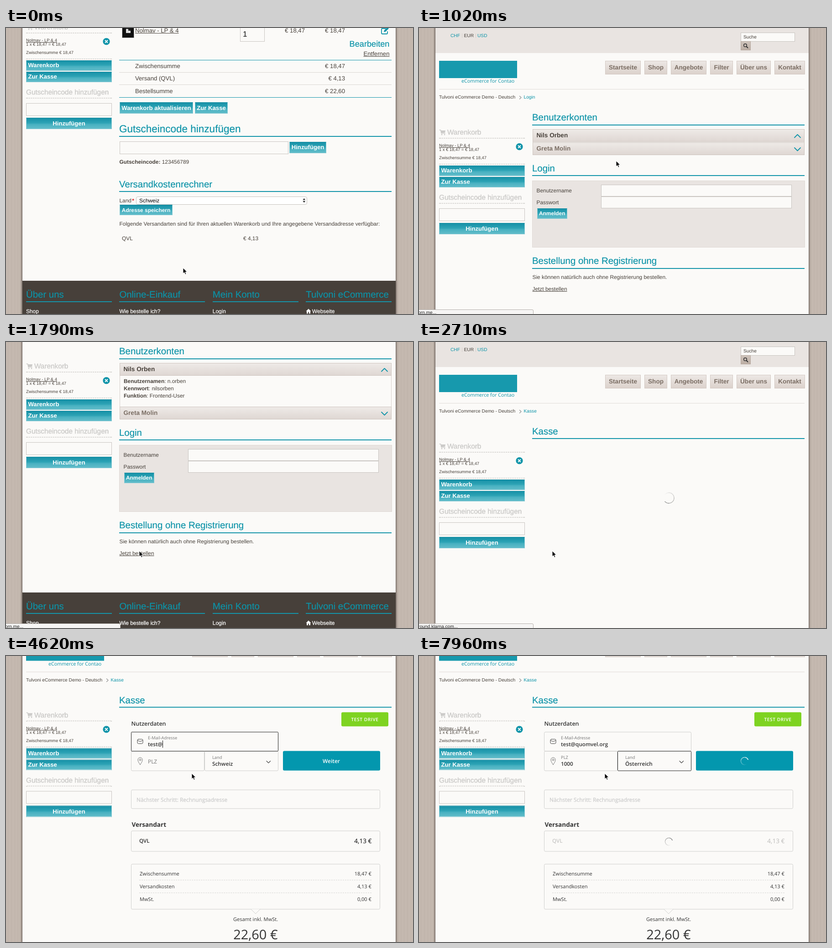
Animation, 892 px wide and 628 px high, one loop 8000 ms. Source, as an HTML page:

```html
<!DOCTYPE html>
<html lang="de">
<head>
<meta charset="utf-8">
<title>Kasse</title>
<style>
html, body { margin: 0; width: 100%; height: 100%; overflow: hidden; }
#stage {
  position: relative; width: 892px; height: 628px; overflow: hidden;
  background: repeating-linear-gradient(90deg, #c5b9b0 0 3px, #c2b6ad 3px 7px);
  font-family: "Liberation Sans", Arial, sans-serif; color: #47403a;
  text-rendering: geometricPrecision;
}
#stage div, #stage span, #stage svg { position: absolute; box-sizing: border-box; }
#stage [hidden] { display: none; }
#stage span { line-height: 20px; white-space: pre; }
#paper { left: 36px; top: -9px; width: 818px; height: 646px; background: #fbfaf8; box-shadow: 0 0 4px 1px #4d443e; }
#world, .page { left: 0; top: 0; width: 892px; }
.c { transform: translateX(-50%); }
.r { transform: translateX(-100%); }
.b { font-weight: bold; }
.k { font-family: "Open Sans", "Noto Sans", sans-serif; }
.s { font-weight: 600; }
.u { text-decoration: underline; }
.teal { color: #0c93a8; }
.head { color: #0c93a8; -webkit-text-stroke: .2px #0c93a8; }
.grey { color: #cbcac8; -webkit-text-stroke: .4px #cbcac8; }
.white { color: #fff; }
.btn { background: linear-gradient(#1791a7, #2da3b5 45%, #48b1c1 60%, #61bcc9); border: 1px solid #8ccbd5; border-top-color: #168ca1; }
.field { background: #fbfaf8; border: 1px solid #c9c5c1; }
.tab { background: linear-gradient(#ece7e4, #dcd2cc); border: 1px solid #d3c9c3; }
.bar { background: linear-gradient(#eeeae7, #dfd7d3); border: 1px solid #cdc4be; }
.dots { border-top: 2px dotted #cfcdca; }
.dash { border-top: 1px dashed #d2d2d0; }
.card { border: 1px solid #cfcfcd; border-radius: 3px; }
.on { border: 1.6px solid #222; border-radius: 2px; z-index: 2; }
.spin {
  border-radius: 50%; background: conic-gradient(transparent 20%, currentColor);
  -webkit-mask: radial-gradient(closest-side, transparent calc(100% - 2px), #000 calc(100% - 1.4px));
  mask: radial-gradient(closest-side, transparent calc(100% - 2px), #000 calc(100% - 1.4px));
}
.caret { display: inline-block; width: 1px; height: 16px; margin-right: -1px; background: #111; vertical-align: -4px; }
#frame { left: 0; top: 0; width: 892px; overflow: hidden; color: #333; }
#frame .ph { color: #757575; }
#status { left: -3px; top: 618px; width: 254px; height: 20px; overflow: hidden; background: #f6f5f4; border: 1px solid #b5b0ac; border-radius: 0 3px 0 0; color: #222; }
</style>
</head>
<body>
<div id="stage"></div>
<script>
const LOOP = 8000;
const box = (x, y, w, h, cls = '', css = '', id = '') =>
  `<div id="${id}" class="${cls}" style="left:${x}px;top:${y}px;width:${w}px;height:${h}px;${css}"></div>`;
// y is the middle of the capitals
const txt = (x, y, s, size, cls = '', css = '', id = '') =>
  `<span id="${id}" class="${cls}" style="left:${x}px;top:${y - 10}px;font-size:${size}px;${css}">${s}</span>`;
const svg = (x, y, w, h, body, css = '') =>
  `<svg width="${w}" height="${h}" style="left:${x}px;top:${y}px;fill:none;stroke-linecap:round;stroke-linejoin:round;${css}">${body}</svg>`;
const rule = (x, y, w, h = 2, color = '#1495aa') => box(x, y, w, h, '', `background:${color}`);
const title = (y, s, size = 20.4) => txt(248, y, s, size, 'head') + rule(248, y + 14.5, 597);
const button = (x, y, w, h, s, size = 13.17, left = false) =>
  box(x, y, w, h, 'btn') + txt(left ? x + 4.5 : x + w / 2, y + h / 2, s, size, 'b white' + (left ? '' : ' c'));
const chevron = (x, y, w, h, color, width = 1.5) =>
  svg(x, y - (h < 0 ? 0 : 0), w + 2, Math.abs(h) + 2,
    `<path d="M1 ${h < 0 ? 1 - h : 1}l${w / 2} ${h}l${w / 2} ${-h}" stroke="${color}" stroke-width="${width}"/>`);

const item = 'Nolmav - LP &amp; 4', carrier = 'QVL';

function header() {
  const nav = [['Startseite', 408, 78], ['Shop', 494, 50], ['Angebote', 552, 78], ['Filter', 638, 50], ['Über uns', 696, 75], ['Kontakt', 779, 67]];
  return rule(36, -10, 818, 65, '#e9e4e1') +
    txt(69, 17.5, 'CHF', 10.2, 'teal') + txt(98.5, 17.5, 'EUR', 10.2) + txt(128, 17.5, 'USD', 10.2, 'teal') +
    rule(94, 12, 1, 10, '#d5cec9') + rule(124, 12, 1, 10, '#d5cec9') +
    box(705, 9.5, 119, 20, 'field') + txt(711, 21, 'Suche', 10.2) +
    box(705, 29, 22, 20, '', 'background:linear-gradient(#cfc4bc,#bcaea4);border:1px solid #b5a79d') +
    svg(710, 33, 13, 13, '<circle cx="5" cy="5" r="3.3" stroke="#333" stroke-width="1.5"/><path d="M7.7 7.7L10.5 10.5" stroke="#333" stroke-width="2"/>') +
    rule(44, 72, 171, 38, '#1799ad') + txt(93, 117, 'eCommerce for Contao', 10.7, 'k teal') +
    nav.map(([s, x, w]) => box(x, 72, w, 29.5, 'tab') + txt(x + w / 2, 86.5, s, 13.6, 'b c', 'color:#7a6d63')).join('') +
    rule(44, 134, 801, 1, '#e0dcd8') + txt(44, 152.5, 'Tulvoni eCommerce Demo - Deutsch', 10.2) +
    svg(219, 148, 7, 10, '<path d="M1.5 1.5l3.5 3.3l-3.5 3.3" stroke="#999" stroke-width="1.4"/>') +
    txt(229.5, 152.5, '', 10.2, 'teal', '', 'crumb');
}

function sidebar() {
  return svg(44, 222, 16, 15, '<path d="M1 2h2.5l1.5 7h8" stroke="#cbcac8" stroke-width="1.5"/><path d="M4 3h10l-1 4.5l-8 .8z" fill="#cbcac8"/><circle cx="6" cy="12" r="1.4" fill="#cbcac8"/><circle cx="12" cy="12" r="1.4" fill="#cbcac8"/>') +
    txt(62, 229.5, 'Warenkorb', 15.3, 'grey') + box(44, 241, 188, 2, 'dots') +
    txt(44, 257.5, item, 9.35, 'u') + txt(44, 267, '1 x € 18,47 = € 18,47', 9.35) +
    svg(211, 252, 18, 18, '<circle cx="9" cy="8.7" r="7.6" fill="#1094a9"/><path d="M6.6 6.3l4.8 4.8M11.4 6.3l-4.8 4.8" stroke="#fff" stroke-width="2"/>') +
    txt(44, 285, 'Zwischensumme € 18,47', 9.35) + box(44, 298, 188, 2, 'dots') +
    button(44, 302, 188, 22.5, 'Warenkorb', 13.1, true) + button(44, 327, 188, 22.5, 'Zur Kasse', 13.1, true) +
    txt(44, 372.5, 'Gutscheincode hinzufügen', 15.3, 'grey') + box(44, 384, 188, 2, 'dots') +
    box(44, 396, 188, 27.5, 'field') + button(44, 428, 188, 25, 'Hinzufügen', 13.1);
}

function cart() {
  const sums = [['Zwischensumme', '€ 18,47'], [`Versand (${carrier})`, '€ 4,13'], ['Bestellsumme', '€ 22,60']];
  return title(197, 'Warenkorb') +
    box(254, 225, 27, 28, '', 'background:#111;border:1px solid #bbb') + rule(263, 233, 10, 9, '#ddd') + rule(268, 233, 5, 4, '#222') +
    txt(283, 236.5, item, 13.17, 'u') + box(513, 227, 54, 34, 'field') + txt(519, 244.5, '1', 17, '', 'color:#111') +
    txt(655, 236.5, '€ 18,47', 13.17, 'r') + txt(743, 236.5, '€ 18,47', 13.17, 'r') +
    svg(821, 228, 20, 20, '<path d="M11 4H4q-2 0-2 2v8q0 2 2 2h9q2 0 2-2v-3" stroke="#1094a9" stroke-width="1.8"/><path d="M7 12l1-4l7-7l3 3l-7 7z" fill="#1094a9"/>') +
    txt(840.5, 265.5, 'Bearbeiten', 18.2, 'r head') + txt(840.5, 287.5, 'Entfernen', 13.17, 'r u') +
    rule(248, 301, 597, 1) + rule(248, 328, 597, 1, '#d9d6d3') + rule(248, 355, 597, 1, '#d9d6d3') + rule(248, 383, 597, 1) +
    sums.map(([a, b], i) => txt(283, 315 + i * 27.4, a, 13.17) + txt(743, 315 + i * 27.4, b, 13.17, 'r')).join('') +
    button(249, 394, 161, 25, 'Warenkorb aktualisieren') + button(414, 394, 72, 25, 'Zur Kasse') +
    title(453, 'Gutscheincode hinzufügen', 22.5) + box(248.5, 480, 370, 27.5, 'field') + button(621, 480.5, 81, 25, 'Hinzufügen') +
    txt(248.5, 525, '<b>Gutscheincode:</b> 123456789', 11.9) + title(574.5, 'Versandkostenrechner') +
    txt(248.5, 609.5, 'Land<b style="color:#d22"> *</b>', 11.9, '', 'word-spacing:-2px') +
    box(285, 601, 375, 17.5, '', 'background:#fff;border:1px solid #c6c2be;border-radius:4px') + txt(292, 609.5, 'Schweiz', 11.9, '', 'color:#000') +
    svg(649, 604, 9, 12, '<path d="M1.5 4.6L4.3 1L7.1 4.6zM1.5 6.8L4.3 10.4L7.1 6.8z" fill="#222"/>') +
    button(249, 619, 116, 23, 'Adresse speichern', 11.9) +
    txt(248.5, 660.5, 'Folgende Versandarten sind für Ihren aktuellen Warenkorb und Ihre angegebene Versandadresse verfügbar:', 11.9) +
    txt(254, 692.5, carrier, 11.9) + txt(520, 692.5, '€ 4,13', 11.9);
}

function login() {
  const info = [['Benutzernamen', 'n.orben'], ['Kennwort', 'nilsorben'], ['Funktion', 'Frontend-User']];
  return title(197, 'Benutzerkonten') +
    `<div id="fold" style="left:248.5px;top:249px;width:596.5px;height:0;overflow:hidden;border:solid #d5cec9;border-width:0 1px">` +
    info.map(([a, b], i) => txt(8.5, 13 + i * 16.2, `<b>${a}</b>: ${b}`, 11.9)).join('') + '</div>' +
    box(248.5, 222, 596.5, 27.5, 'bar') + txt(257.5, 236, 'Nils Orben', 13.6, 'b') + chevron(822, 233, 13, -6.5, '#1094a9', 1.8) +
    '<div id="rest">' +
    box(248.5, 251, 596.5, 27.5, 'bar') + txt(257.5, 265, 'Greta Molin', 13.6, 'b', 'color:#7a6d63') + chevron(822, 262, 13, 6.5, '#1094a9', 1.8) +
    title(308.5, 'Login') + box(248, 334.5, 597.5, 147, '', 'background:#e9e4e1;border:1px solid #dfd9d5') +
    txt(257.5, 357, 'Benutzername', 11.9) + txt(257.5, 383, 'Passwort', 11.9) +
    box(398.5, 344, 418.5, 26, 'field') + box(398.5, 369.5, 418.5, 26, 'field') + button(258.5, 396, 66.5, 22.5, 'Anmelden', 11.9) +
    title(512, 'Bestellung ohne Registrierung') +
    txt(248.5, 546.5, 'Sie können natürlich auch ohne Registrierung bestellen.', 11.9) + txt(248.5, 573, 'Jetzt bestellen', 11.9, 'u') + '</div>';
}

function checkout() {
  const sums = [['Zwischensumme', '18,47 €'], ['Versandkosten', '4,13 €'], ['MwSt.', '0,00 €']];
  return title(196.5, 'Kasse') + box(534.5, 329.5, 25, 25, 'spin', 'color:#999', 'wait') + '<div id="frame">' +
    txt(274.5, 248, 'Nutzerdaten', 12.5, 'k s') +
    box(735, 223, 103, 30.5, '', 'background:#7ed321;border-radius:3px') + txt(786.5, 238, 'TEST DRIVE', 10.2, 'k s c white', 'letter-spacing:.55px') +
    box(274, 265.5, 322.5, 43.5, 'card', '', 'mailBox') + box(274, 308, 161, 43.5, 'card', '', 'zipBox') + box(434.5, 308, 162, 43.5, 'card', '', 'landBox') +
    svg(287, 281, 15, 13, '<rect x="1" y="1.2" width="12" height="9.8" rx="2.4" stroke="#444"/><path d="M1.2 3.4q5.8 5.4 11.6 0" stroke="#444"/>') +
    svg(287, 321, 14, 19, '<path d="M7 17Q2 10.5 2 6.4a5 5 0 0 1 10 0Q12 10.5 7 17z" stroke="#777"/><circle cx="7" cy="6.5" r="1.9" stroke="#777"/>') +
    txt(311, 287.5, 'E-Mail-Adresse', 11.9, 'k ph', '', 'mailLabel') + txt(311, 293, '', 11.7, 'k s', '', 'mail') +
    txt(311, 330.5, 'PLZ', 11.9, 'k ph', '', 'zipLabel') + txt(311, 335.5, '', 11.7, 'k s', '', 'zip') +
    txt(452, 322, 'Land', 9.35, 'k ph') + txt(452, 335.5, '', 11.8, 'k s', '', 'land') + chevron(570, 328.5, 8.5, 4.5, '#444', 1.1) +
    box(606.5, 308, 213, 43, '', 'background:#0397ae;border-radius:3px') +
    txt(713, 330, 'Weiter', 11.9, 'k s c white', '', 'next') + box(704.5, 321, 17.5, 17.5, 'spin white', '', 'nextSpin') +
    box(274, 393, 545.5, 41.5, 'card') + txt(286, 414.5, 'Nächster Schritt: Rechnungsadresse', 11.9, 'k', 'color:#ccc;-webkit-text-stroke:.3px #ccc') +
    txt(275.5, 468.5, 'Versandart', 13.6, 'k b') + box(274, 483, 545.5, 45.5, 'card') +
    '<div id="ship">' + txt(292, 505, carrier, 11.7, 'k s') + txt(801.5, 505, '4,13 €', 13.6, 'k r', 'color:#000') + '</div>' +
    box(538.5, 497.5, 17.5, 17.5, 'spin', 'color:#888', 'shipSpin') +
    box(274, 555.5, 545.5, 100.5, 'card') +
    sums.map(([a, b], i) => txt(293, 578 + i * 28, a, 11.05, 'k') + txt(801, 578 + i * 28, b, 11.05, 'k r')).join('') +
    box(292, 591, 509, 1, 'dash') + box(292, 619, 509, 1, 'dash') +
    svg(536, 654, 22, 14, '<path d="M1 1.5L11 11.5L21 1.5" fill="#fbfaf8" stroke="#cfcfcd"/>') +
    txt(547, 677.5, 'Gesamt inkl. MwSt.', 11.05, 'k c') + txt(547, 710.5, '22,60 €', 28.9, 'k c') + '</div>';
}

function footer() {
  const cols = [['Über uns', 'Shop'], ['Online-Einkauf', 'Wie bestelle ich?'], ['Mein Konto', 'Login'], ['Tulvoni eCommerce', '   Webseite']];
  return rule(36, 0, 818, 400, '#47403a') + cols.map(([a, b], i) => {
    const x = 44 + i * 204.4;
    return txt(x, 30.5, a, 20.4, 'head') + rule(x, 45, 188, 1.5) +
      txt(x + (i > 2 ? 4 : 0), 67, b, 11.9, 'white', '-webkit-text-stroke:.25px #fff');
  }).join('') + svg(657, 61, 13, 12, '<path d="M6 0.5L0.5 6H2v5h3V7.5h2V11h3V6h1.5z" fill="#fff"/>');
}

stage.innerHTML = '<div id="paper"></div><div id="world">' + header() + sidebar() +
  [['cart', cart], ['login', login], ['checkout', checkout], ['foot', footer]].map(([id, f]) => `<div id="${id}" class="page">${f()}</div>`).join('') +
  '</div><div id="status">' + txt(0, 7, '', 10.2, '', '', 'statusText') + '</div>' +
  `<div id="pointer">${svg(-1, -1, 14, 19, '<path d="M1 1V13.2L3.9 10.6L5.9 15.2L8 14.3L6 9.8H9.8z" fill="#000" stroke="#fff"/>')}</div>`;

const el = id => document.getElementById(id);
const show = (id, on) => { el(id).hidden = !on; };

const scrollKeys = [[50, 231], [280, 112], [970, 112], [970, 0], [1070, 0], [1300, 139], [1340, 139], [1570, 176], [2170, 176], [2170, 0], [3260, 0], [3740, 99.5]];
const foldKeys = [[1040, 0], [1310, 67]];
const pointerX = [[50, 388], [280, 432], [1050, 432], [1300, 285], [1340, 285], [1520, 292], [3010, 292], [3500, 242], [3850, 242], [4450, 407]];
const pointerY = [[50, 527], [280, 292], [1050, 292], [1300, 558], [1340, 558], [1520, 459], [3010, 459], [3500, 517], [3850, 517], [4450, 258]];
const statusKeys = [[0, ''], [500, 'orn.me/kasse'], [640, 'orn.me...'], [1220, ''], [1520, 'orn.me/kasse'], [1790, 'orn.me...'], [2420, 'round.klarna.com...'], [3160, '']];
const mailTimes = [4120, 4250, 4380, 4480, 4620, 4670, 4820, 4960, 5100, 5230, 5360, 5620, 5970, 6180, 6260, 6330];
const zipTimes = [6680, 6790, 6890, 6990];

// eased value from a table of [time, value]
function at(keys, t) {
  const i = keys.findIndex(k => k[0] > t);
  if (i < 0) return keys[keys.length - 1][1];
  if (!i) return keys[0][1];
  const [t0, a] = keys[i - 1], [t1, b] = keys[i], q = 1 - (t - t0) / (t1 - t0);
  return a + (b - a) * (1 - q * q);
}
const last = (keys, t) => keys.filter(k => k[0] <= t).pop()[1];

function input(id, text, times, t, focus, empty, full) {
  const typed = text.slice(0, times.filter(x => x <= t).length);
  const value = typed + (focus ? '<i class="caret"></i>' : '');
  if (el(id).innerHTML !== value) el(id).innerHTML = value;
  el(id).style.top = (typed ? full[1] : empty) - 10 + 'px';
  el(id + 'Label').style.top = (typed ? full[0] : empty) - 10 + 'px';
  el(id + 'Label').style.fontSize = typed ? '9.35px' : '11.9px';
  el(id + 'Box').classList.toggle('on', focus);
}

function render(t) {
  const page = t < 970 ? 'cart' : t < 2170 ? 'login' : 'checkout';
  for (const id of ['cart', 'login', 'checkout']) show(id, id === page);
  el('world').style.transform = `translateY(${-at(scrollKeys, t)}px)`;
  el('crumb').textContent = { cart: 'Warenkorb', login: 'Login', checkout: 'Kasse' }[page];

  const open = at(foldKeys, t);
  el('fold').style.height = open + 2 + 'px';
  el('rest').style.transform = `translateY(${open}px)`;
  const footY = page === 'cart' ? 786 : page === 'login' ? 659 + open : t < 3820 ? 719 : 900;
  el('foot').style.transform = `translateY(${footY}px)`;

  const busy = t >= 7660, turn = `rotate(${t / 800 * 360 % 360 + 90}deg)`;
  show('wait', t >= 2320 && t < 3010);
  show('frame', t >= 3010);
  el('frame').style.height = (t < 3820 ? 649 : 800) + 'px';
  input('mail', 'test@quomvel.org', mailTimes, t, t < 6490, 287.5, [278.5, 293]);
  input('zip', '1000', zipTimes, t, t >= 6490 && t < 7120, 330.5, [321.5, 335.5]);
  el('landBox').classList.toggle('on', t >= 7120);
  el('land').textContent = t < 7450 ? 'Schweiz' : 'Österreich';
  show('next', !busy);
  show('nextSpin', busy);
  show('shipSpin', busy);
  el('ship').style.opacity = busy ? .25 : 1;
  for (const id of ['wait', 'nextSpin', 'shipSpin']) el(id).style.transform = turn;

  const status = last(statusKeys, t);
  show('status', status);
  el('statusText').textContent = status;
  el('pointer').style.transform = `translate(${at(pointerX, t)}px,${at(pointerY, t)}px)`;
}

const start = performance.now();
function tick() {
  render((performance.now() - start) % LOOP);
  requestAnimationFrame(tick);
}
tick();
</script>
</body>
</html>
```
